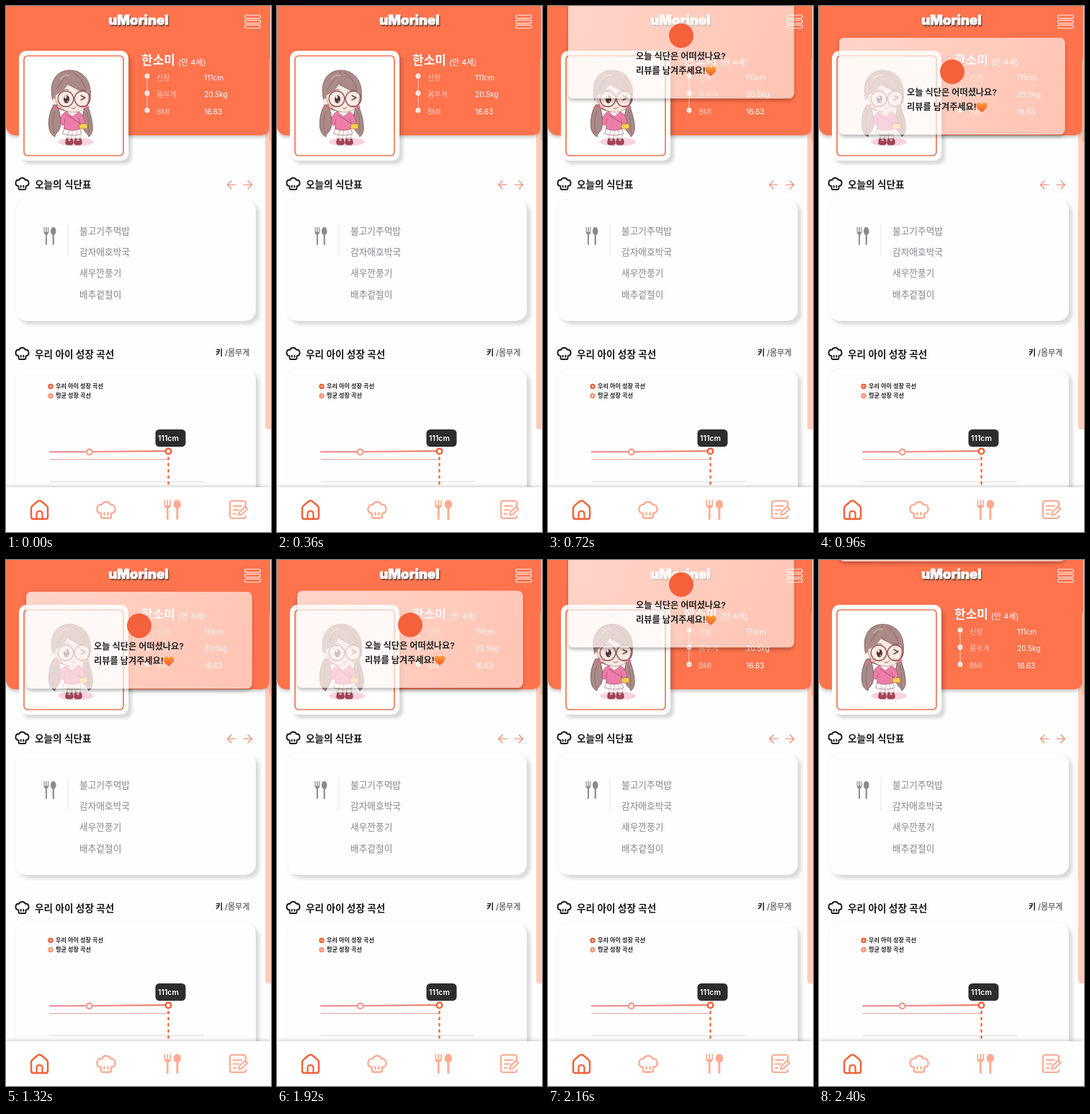
An HTML page with a canvas that plays this animation: 368 by 728 pixels, repeating every 2.52 s.

```html
<!DOCTYPE html>
<html lang="ko">
<head>
<meta charset="utf-8">
<title>성장 기록</title>
<style>
html, body { margin: 0; width: 100%; height: 100%; overflow: hidden; background: #fff; }
canvas { display: block; width: 368px; height: 728px; }
</style>
</head>
<body>
<canvas id="stage"></canvas>
<script>
const W = 368, H = 728, LOOP = 2520, STEP = 120;
const FONT = 'Inter, "Noto Sans CJK KR", "Noto Sans KR", "Noto Sans CJK", sans-serif';
const ORANGE = '#ff734d', DEEP = '#f45f35', SALMON = '#ffab92', WHITE = '#fff';
const canvas = document.getElementById('stage');
const ratio = window.devicePixelRatio || 1;
canvas.width = W * ratio;
canvas.height = H * ratio;
const c = canvas.getContext('2d');

const HAT = new Path2D('M7 15.4V18.5Q7 20 8.5 20H15.5Q17 20 17 18.5V15.4C20 15 21.3 13 21 10.4C20.6 7.7 18.6 6.5 16.4 6.8C15.4 4.8 14 4 12 4S8.6 4.8 7.6 6.8C5.4 6.5 3.4 7.7 3 10.4C2.7 13 4 15 7 15.4ZM10.2 16.8V14.8M13.8 16.8V14.8');
const FORK = new Path2D('M0 0V7Q0 10 2.5 10.7V24Q2.5 25.5 3.5 25.5T4.5 24V10.7Q7 10 7 7V0H5.8V7H4.2V0H2.8V7H1.2V0Z');
const SPOON = new Path2D('M13.5 0C16 0 17.3 3 17.3 6C17.3 8.6 16.2 10.2 14.6 11V24Q14.6 25.5 13.5 25.5T12.4 24V11C10.8 10.2 9.7 8.6 9.7 6C9.7 3 11 0 13.5 0Z');
const HEART = new Path2D('M0 7C-4 4-7.4 1.4-7.4-2.4C-7.4-6.8-2-7.8 0-4C2-7.8 7.4-6.8 7.4-2.4C7.4 1.4 4 4 0 7Z');

function text(s, x, y, size, color, weight = 400) {
  c.font = `${weight} ${size}px ${FONT}`;
  c.fillStyle = color;
  c.fillText(s, x, y + size * 0.36);
}

function shadow(color, blur, dx, dy) {
  c.shadowColor = color;
  c.shadowBlur = blur * ratio;
  c.shadowOffsetX = dx * ratio;
  c.shadowOffsetY = dy * ratio;
}

function noShadow() { shadow('transparent', 0, 0, 0); }

function box(x, y, w, h, r, fill) {
  c.beginPath();
  c.roundRect(x, y, w, h, r);
  c.fillStyle = fill;
  c.fill();
}

function frame(x, y, w, h, r, color, width) {
  c.beginPath();
  c.roundRect(x, y, w, h, r);
  pen(color, width);
  c.stroke();
}

function pen(color, width, cap = 'round') {
  c.strokeStyle = color;
  c.lineWidth = width;
  c.lineCap = cap;
  c.lineJoin = 'round';
}

function oval(x, y, rx, ry, fill) {
  c.beginPath();
  c.ellipse(x, y, rx, ry, 0, 0, Math.PI * 2);
  c.fillStyle = fill;
  c.fill();
}

function ring(x, y, r, color, width) {
  oval(x, y, r, r, WHITE);
  pen(color, width);
  c.stroke();
}

function line(d, color, width, cap) {
  pen(color, width, cap);
  c.stroke(new Path2D(d));
}

function shape(d, fill, edge, width = 0.8) {
  const p = new Path2D(d);
  c.fillStyle = fill;
  c.fill(p);
  if (edge) { pen(edge, width); c.stroke(p); }
}

function at(x, y, sx, sy, draw) {
  c.save();
  c.translate(x, y);
  c.scale(sx, sy);
  draw();
  c.restore();
}

function hat(x, y, scale, color, width) {
  at(x, y, scale, scale, () => {
    c.translate(-12, -12);
    pen(color, width);
    c.stroke(HAT);
  });
}

function cutlery(x, y, sx, sy, color) {
  at(x, y, sx, sy, () => {
    c.fillStyle = color;
    c.fill(FORK);
    c.fill(SPOON);
  });
}

function header() {
  shadow('rgba(0,0,0,.2)', 4, 0, 3);
  box(0, -20, 367, 199, 13, ORANGE);
  noShadow();
  box(365.5, 72, 4, 115, 2, '#f7b39d');
  c.font = `900 18.5px ${FONT}`;
  c.textAlign = 'center';
  for (const [color, shift] of [['#75483b', 1.2], [WHITE, 0]]) {
    pen(color, 0.7);
    c.fillStyle = color;
    c.strokeText('uMorinel', 184 + shift, 26.3 + shift);
    c.fillText('uMorinel', 184 + shift, 26.3 + shift);
  }
  c.textAlign = 'left';
  for (let i = 0; i < 3; i++) frame(331.5, 12.8 + i * 6.8, 22, 4.3, 2.1, '#ffe9e2', 1.1);
}

function profile() {
  text('한소미', 188, 75, 17, WHITE, 700);
  text('(만 4세)', 239, 78, 11, WHITE);
  line('M196 97V144', 'rgba(255,255,255,.7)', 1);
  const rows = [['신장', '111cm'], ['몸무게', '20.5kg'], ['BMI', '16.63']];
  rows.forEach(([label, value], i) => {
    const y = 97 + i * 23.7;
    oval(196, y, 3.4, 3.4, WHITE);
    line(`M194.6 ${y}l1.1 1.1 1.8-2.1`, ORANGE, 0.8);
    text(label, 209, y + 2, 10, '#ffc9b8');
    text(value, 275, y + 2, 10.2, WHITE);
  });
}

function girl() {
  const hair = '#aa8b89', edge = '#71494b', skin = '#fdebe1', pink = '#ec7da9';
  oval(97, 188, 25, 6, '#f8d3df');
  // pigtails
  shape('M68 134C61 143 58 158 60 170C61 175 64 179 68 181C68 177 72 175 74 171C78 162 75 148 72 139Z', hair, edge);
  shape('M110 137C106 148 105 161 108 171C110 175 114 177 115 181C119 178 121 172 120 165C119 154 116 144 112 136Z', hair, edge);
  line('M68 146C64 156 64 166 67 176M112 146C115 157 115 166 115 175', '#856463', 0.7);
  // legs and shoes
  for (const x of [85, 97]) {
    box(x, 174, 6, 8, 1, skin);
    box(x, 179, 6, 7, 1, WHITE);
    frame(x, 176, 6, 10, 1, '#a98783', 0.6);
    shape(`M${x - 1} 184h8q3 7-1 8h-6q-4-1-1-8Z`, '#a84355', '#70313d');
    oval(x + 3, 185.5, 2, 1.1, '#f3d7d5');
  }
  shape('M82 166H101L105 177Q93 181 79 177Z', '#faf7f6', '#9d7e80');
  line('M87 170l-1 8M92 170v9M98 170l1 8', '#c8b1b3', 0.8);
  shape('M84 146Q76 149 75 161Q77 167 81 164L81 170Q92 174 103 170L103 164Q108 165 110 160Q107 148 99 146Z', pink, '#a64e6b');
  line('M81 163l1-8M103 163l-2-8', '#b55575', 0.8);
  shape('M85 147l7 6 8-6-4-3h-8Z', '#fff5f4', '#ad7b83', 0.7);
  line('M85 151L105 164', '#9b4d61', 0.9);
  box(102, 163, 11, 7, 2.5, '#f5cf4e');
  frame(102, 163, 11, 7, 2.5, '#a17639', 0.7);
  // head
  shape('M65 130C59 110 67 90 87 89C106 88 120 103 117 127C115 137 109 145 93 146C76 146 68 141 65 130Z', hair, edge);
  oval(68, 132, 3.5, 4.5, skin);
  shape('M68 122C74 118 81 114 83 107C94 114 105 116 114 116C118 133 110 147 94 147C79 147 68 138 68 122Z', skin, '#a8736d', 0.7);
  shape('M64 126C61 106 71 90 89 90C106 89 118 102 117 119C105 119 95 115 87 107C83 115 74 122 64 126Z', hair);
  line('M89 91C82 96 77 106 70 115M93 92C103 97 108 107 111 116M87 107C91 111 97 115 102 117', '#80605f', 0.8);
  line('M76 101Q81 95 87 96', '#c6aca7', 2);
  oval(76, 139, 4, 2, '#f7b9b3');
  oval(107, 139, 4, 2, '#f7b9b3');
  oval(84, 129, 4, 5.6, '#523638');
  oval(82.8, 126, 1.5, 2, WHITE);
  oval(85.5, 132, 1, 1.3, '#d39d94');
  line('M104 124l6 3-6 3', '#654043', 1.4);
  line('M79 117q4-3 8-1M102 117q4-2 7 0', '#805957', 0.9);
  line('M91 141q3 3 6-1', '#9c4e51', 1);
  for (const x of [83, 106]) {
    c.beginPath();
    c.arc(x, 128.5, 10.8, 0, Math.PI * 2);
    pen('#91555a', 1.4);
    c.stroke();
  }
  line('M94 127q.5-1 1 0', '#91555a', 1.4);
  oval(69, 141, 2.5, 2, '#e96e92');
  oval(113, 140, 2.5, 2, '#e96e92');
}

function avatar() {
  shadow('rgba(0,0,0,.15)', 4, 5, 5);
  box(18, 62, 152, 152, 10, WHITE);
  noShadow();
  frame(25, 69, 138, 138, 5, '#ef7653', 1.7);
  girl();
}

function card(y, h) {
  shadow('rgba(0,0,0,.14)', 5, 5, 5);
  box(13, y, 334, h, 15, '#fefefe');
  noShadow();
  frame(13, y, 334, h, 15, 'rgba(0,0,0,.025)', 1);
}

function menu() {
  hat(22.5, 246, 1, '#151515', 1.9);
  text('오늘의 식단표', 40, 247, 13.6, '#191919', 600);
  line('M319 247.5H307.5l5.5-5.5M307.5 247.5l5.5 5.5', '#f58a6b', 1.2);
  line('M330 247.5h11.5l-5.5-5.5M341.5 247.5l-5.5 5.5', '#f58a6b', 1.2);
  card(267, 169);
  cutlery(52.5, 306, 0.98, 0.98, '#8b8990');
  line('M86 301.5V346', '#e4e4e7', 1);
  ['불고기주먹밥', '감자애호박국', '새우깐풍기', '배추겉절이'].forEach((dish, i) =>
    text(dish, 102, 311 + i * 29.4, 12.7, '#85858e'));
}

function growth() {
  hat(22.5, 481, 1, '#151515', 1.9);
  text('우리 아이 성장 곡선', 40, 482, 13.6, '#191919', 600);
  text('키', 291, 480, 11, '#191919', 700);
  text('/몸무게', 304, 480, 11, '#333');
  card(502, 240);
  [['우리 아이 성장 곡선', DEEP], ['평균 성장 곡선', '#ff9272']].forEach(([label, color], i) => {
    const y = 526 + i * 13;
    oval(62, y + 0.5, 3.7, 3.7, color);
    oval(62, y + 0.5, 1.3, 1.3, '#ffe3da');
    text(label, 69, y, 8.15, '#222', 600);
  });
  line('M61 658.5H275', '#dededf', 1);
  line('M61 627.5H225', '#dda597', 1);
  const fade = c.createLinearGradient(61, 0, 225, 0);
  fade.addColorStop(0, '#f590a0');
  fade.addColorStop(1, '#ee806b');
  line('M61 617.2L115 617L225 615.8', fade, 2.2);
  c.setLineDash([4.5, 4]);
  line('M225.5 624V668', DEEP, 2.2, 'butt');
  c.setLineDash([]);
  ring(115.7, 617.3, 3.8, '#f5a08c', 2.3);
  ring(225.5, 616.3, 3.8, DEEP, 2.4);
  box(207.5, 586, 42, 24, 5.5, '#2d2d2d');
  text('111cm', 211, 598, 10.5, WHITE, 600);
}

function nav() {
  shadow('rgba(0,0,0,.22)', 5, 0, -1);
  box(0, 666, W, 70, 0, WHITE);
  noShadow();
  line('M35 695.5Q35 693 37 691.3L44 685.5Q46.5 683.8 49 685.5L56 691.3Q58 693 58 695.5V707Q58 710 55 710H38Q35 710 35 707Z', DEEP, 2.4);
  line('M42.5 710V703Q42.5 699 46.5 699T50.5 703V710', DEEP, 2.2);
  hat(139, 697.5, 1.4, SALMON, 1.7);
  cutlery(219.5, 683.5, 1.36, 1.08, SALMON);
  line('M333 692V688Q333 685 330 685H314Q311 685 311 688V706Q311 709 314 709H330Q333 709 333 706M316 692H327M316 697.5H323M316 703H319', SALMON, 2.2);
  line('M323 704.5L324 700.5L332 692.7L335.5 696L327.3 703.7Z', SALMON, 2);
}

// Vertical offset of the banner: slides in decelerating, leaves accelerating.
function bannerShift(t) {
  if (t < 960) return -50 * ((960 - t) / 240) ** 2;
  if (t < 1890) return 0;
  return -57 * ((t - 1890) / 270) ** 1.774;
}

function banner(t) {
  const dy = bannerShift(t);
  if (dy < -190) return;
  c.save();
  c.translate(0, dy);
  // the drop shadow shows only outside the translucent panel
  c.save();
  const outside = new Path2D();
  outside.rect(-20, -200, 420, 1000);
  outside.roundRect(28, 44, 313.5, 134, 7);
  c.clip(outside, 'evenodd');
  shadow('rgba(0,0,0,.28)', 5, 0, 3);
  box(28, 44, 313.5, 134, 7, WHITE);
  c.restore();
  const glass = c.createLinearGradient(28, 44, 341, 178);
  glass.addColorStop(0, 'rgba(255,246,243,.74)');
  glass.addColorStop(1, 'rgba(255,246,243,.62)');
  box(28, 44, 313.5, 134, 7, glass);
  oval(185, 91, 17, 17, '#f4613b');
  text('오늘 식단은 어떠셨나요?', 122, 120, 12.2, '#222', 600);
  text('리뷰를 남겨주세요!', 122, 139.5, 12.2, '#222', 600);
  at(226, 140, 1, 1, () => {
    const glow = c.createLinearGradient(0, -7, 0, 7);
    glow.addColorStop(0, '#ffa534');
    glow.addColorStop(1, '#f4572e');
    c.fillStyle = glow;
    c.fill(HEART);
  });
  c.restore();
}

function draw(t) {
  c.setTransform(ratio, 0, 0, ratio, 0, 0);
  c.fillStyle = '#fefefe';
  c.fillRect(0, 0, W, H);
  box(360, 72, 10, 514, 4, '#ffcdb9');
  header();
  profile();
  avatar();
  menu();
  growth();
  nav();
  banner(t);
}

const start = performance.now();
function tick() {
  const t = (performance.now() - start) % LOOP;
  draw(Math.floor(t / STEP) * STEP);
  requestAnimationFrame(tick);
}
tick();
</script>
</body>
</html>
```
